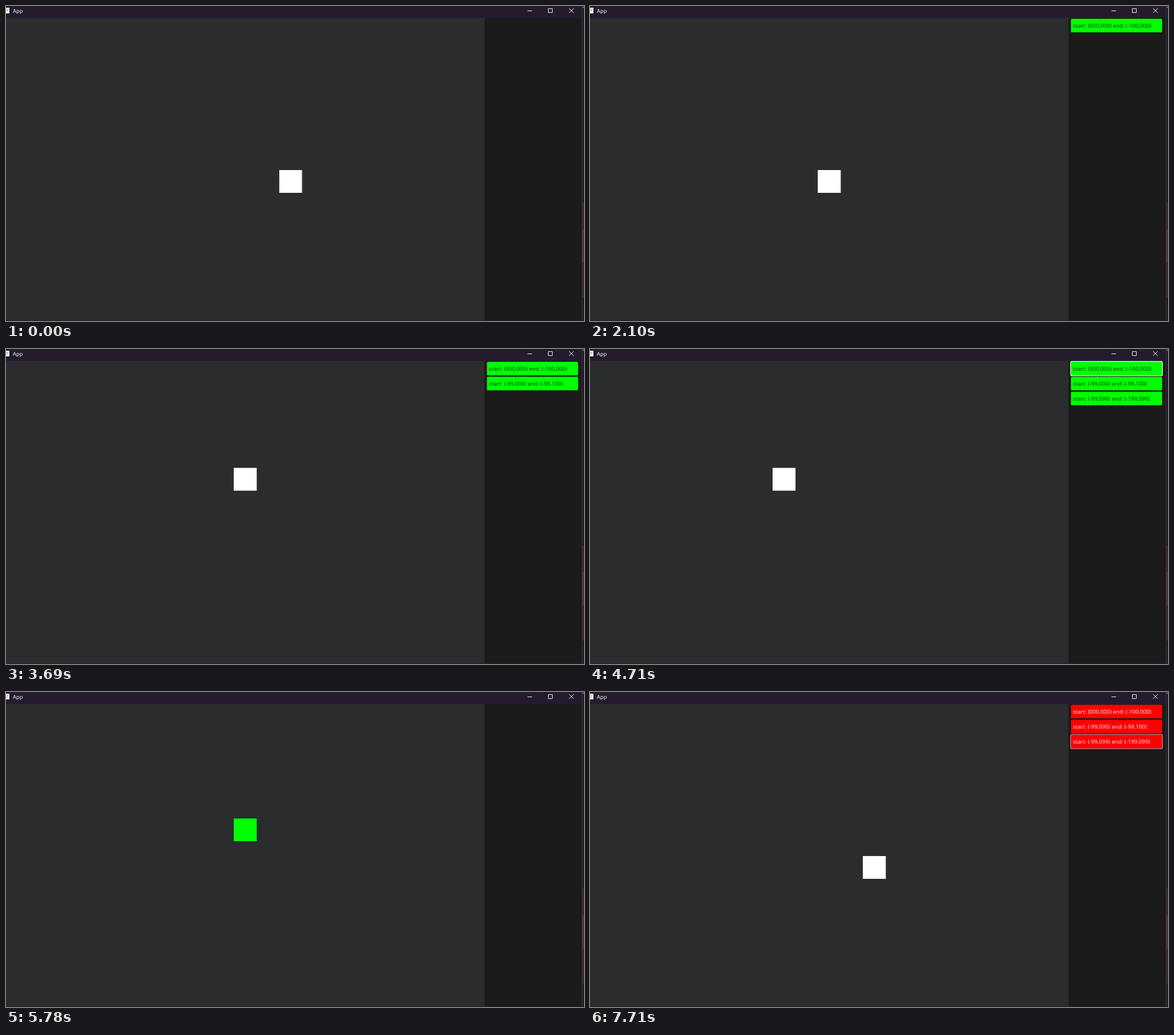
These frames come from a looping animation (1013x553 px, 8 s). An HTML page:

```html
<!DOCTYPE html>
<html lang="en">
<head>
<meta charset="utf-8">
<title>App</title>
<style>
  html, body { margin: 0; width: 100%; height: 100%; overflow: hidden; background: #2b2c2e; }
  svg { display: block; width: 1013px; height: 553px; }
  text { white-space: pre; }
  .title { font: 9.4px "Open Sans", sans-serif; fill: #fff; }
  .chrome { fill: none; stroke: #f4f2f6; stroke-width: 1; }

  /* 8 s loop: 1% = 80 ms */
  .box, .card, .card * { animation: 8s step-end infinite; }

  .box { fill: #fff; animation-name: travel, play; }
  @keyframes travel {
    0% { transform: translate(478.5px, 288px); }
    2% { transform: translate(478.5px, 288px); animation-timing-function: steps(30, start); }
    14.86%, 21.625% { transform: translate(399.2px, 288px); }
    21.625% { animation-timing-function: steps(30, start); }
    33.85%, 38.125% { transform: translate(399.2px, 208.7px); }
    38.125% { animation-timing-function: steps(30, start); }
    50.31%, 60.1% { transform: translate(320px, 208.7px); }
    60.1% { animation-timing-function: steps(27, start); }
    70.75% { transform: translate(399.2px, 210px); animation-timing-function: steps(26, start); }
    81.8% { transform: translate(399.2px, 288px); animation-timing-function: steps(26, start); }
    92.24%, 100% { transform: translate(478.2px, 288px); }
  }
  @keyframes play { 60.1% { fill: #0f0; } 92.2%, 100% { fill: #fff; } }

  .card { opacity: 0; }
  .c1 { animation-name: show1; }
  .c2 { animation-name: show2; }
  .c3 { animation-name: show3; }
  @keyframes show1 { 14.44% { opacity: 1; } 60.1% { opacity: 0; } 92.2%, 100% { opacity: 1; } }
  @keyframes show2 { 33.44% { opacity: 1; } 60.1% { opacity: 0; } 92.2%, 100% { opacity: 1; } }
  @keyframes show3 { 49.85% { opacity: 1; } 60.1% { opacity: 0; } 92.2%, 100% { opacity: 1; } }

  .card rect { fill: #0f0; animation-name: tint; }
  .card text { font: 9.68px "Noto Sans", "Open Sans", sans-serif; fill: #053d05; animation-name: ink; }
  @keyframes tint { 75%, 100% { fill: #f00; } }
  @keyframes ink { 75%, 100% { fill: #ffe9e9; } }

  .card .ring { stroke: #a0a0a0; stroke-width: 1.2; opacity: 0; }
  .c1 .ring { animation-name: tint, hover1, press; }
  .c2 .ring { animation-name: tint, hover2; }
  .c3 .ring { animation-name: tint, hover3; }
  @keyframes hover1 { 55.95% { opacity: 1; } 60.1%, 100% { opacity: 0; } }
  @keyframes hover2 { 54.08% { opacity: 1; } 55.95% { opacity: 0; } 92.2% { opacity: 1; } 96.32%, 100% { opacity: 0; } }
  @keyframes hover3 { 53.7% { opacity: 1; } 54.08% { opacity: 0; } 96.32%, 100% { opacity: 1; } }
  @keyframes press { 58.82%, 100% { stroke: #fff; } }
</style>
</head>
<body>
<svg viewBox="0 0 1013 553">
  <rect width="1013" height="553" fill="#2b2c2e"/>
  <rect x="838.5" y="20" width="171" height="533" fill="#1b1b1b"/>

  <!-- title bar -->
  <rect width="1009" height="21" fill="#241c2d"/>
  <rect y="3" width="6" height="10" fill="#eee"/>
  <path d="M1 6h3M1 8h2" stroke="#999" fill="none"/>
  <text class="title" x="12" y="12.3">App</text>
  <path class="chrome" d="M914 8.5h8M950.5 4.5h7v7h-7zM987 4l8 8M995 4l-8 8"/>

  <!-- window edge -->
  <rect x="1009" width="4" height="553" fill="#1f1b24"/>
  <rect x="1009" y="345" width="4" height="167" fill="#3c2529"/>
  <rect x="1009" y="392" width="4" height="59" fill="#4d3438"/>
  <rect x="1009" width="1" height="553" fill="#38333d"/>
  <path d="M1010 1l2 2l2-2" stroke="#aaa" fill="none"/>
  <rect y="552" width="1009" height="1" fill="#2a1d26"/>

  <rect class="box" width="40.2" height="40"/>

  <g class="card c1">
    <rect x="843" y="22.5" width="159.6" height="23.8" rx="1.6"/>
    <rect class="ring" x="842.4" y="21.9" width="160.8" height="25" rx="2"/>
    <text x="846.3" y="37.6">start: (000,000) end: (-100,000)</text>
  </g>
  <g transform="translate(0 26.3)">
    <g class="card c2">
      <rect x="843" y="22.5" width="159.6" height="23.8" rx="1.6"/>
      <rect class="ring" x="842.4" y="21.9" width="160.8" height="25" rx="2"/>
      <text x="846.3" y="37.6">start: (-99,000) end: (-99,100)</text>
    </g>
  </g>
  <g transform="translate(0 52.6)">
    <g class="card c3">
      <rect x="843" y="22.5" width="159.6" height="23.8" rx="1.6"/>
      <rect class="ring" x="842.4" y="21.9" width="160.8" height="25" rx="2"/>
      <text x="846.3" y="37.6">start: (-99,099) end: (-199,099)</text>
    </g>
  </g>
</svg>
</body>
</html>
```
